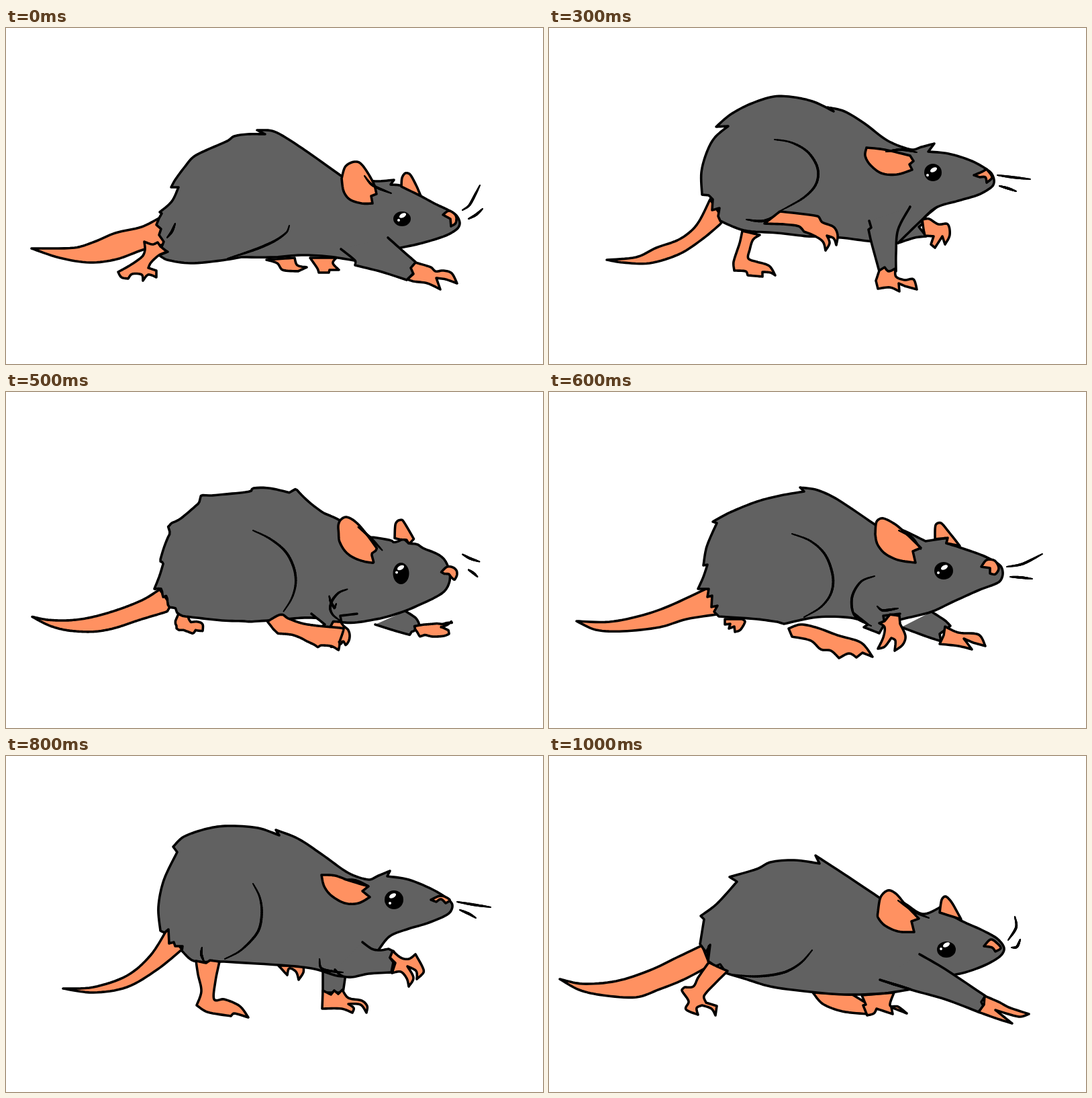
Animation of 800 by 500 pixels, one loop 1.1 s. Source, as an HTML page with a canvas:

```html
<!DOCTYPE html>
<html lang="en">
<head>
<meta charset="utf-8">
<title>Running rat</title>
<style>
html, body { margin: 0; width: 100%; height: 100%; overflow: hidden; background: #fff; }
canvas { display: block; width: 800px; height: 500px; }
</style>
</head>
<body>
<canvas id="stage" width="800" height="500"></canvas>
<script>
const ctx = document.getElementById('stage').getContext('2d');
const GREY = '#616161', SKIN = '#ff9161', INK = '#000';
const STEP = 100, STEPS = 11;

// Curves are "x,y" points; * marks a sharp corner.
// Eye: x y rx ry, then the centres of the large and the small glint.
const poses = {
  0: {
    tail: '38,328* 102,327 132,318 163,305 202,296 228,283* 240,300* 236,322* 204,330 165,344 125,349 80,342 38,328',
    farHind: '388,345* 404,350 412,360 435,362* 448,356* 434,353 430,342*',
    farHand: '453,342* 464,358 466,364* 481,364* 482,360* 496,360* 487,350 492,342*',
    body: '228,283* 232,276* 229,274* 247,258 257,237* 246,237* 252,226 266,207 279,192 298,182 330,168 340,161 360,158 386,158* 374,152* 396,153 415,162 450,185 502,222* 525,225 552,228 578,226* 573,233* 590,235 616,249 640,262 659,271 671,279 676,290 672,299 655,309 620,320 588,327* 519,346* 480,340 440,338 400,341 350,341* 320,346 275,350 240,345 228,338* 241,333* 231,328* 235,318* 228,308* 231,299* 224,293*',
    hind: '206,318* 218,322 226,319* 230,325* 240,333* 228,338 216,349 212,357* 224,361* 224,371* 212,367 204,376* 202,367 188,366 182,373* 172,371 167,363* 185,353 203,340 207,330',
    arm: '569,312 588,329 610,348* 607,356* 610,362* 597,375* 560,363 520,353* 520,346 499,329',
    hand: '610,349* 633,356 640,362 652,361 664,365 672,380* 655,374 641,372* 647,389* 628,380 607,377 598,374* 607,366* 603,357*',
    farEar: '589,236* 590,223 595,216 602,218 611,234 618,250*',
    ear: '500,224 505,207 515,200 526,200 536,211 548,232 552,247* 544,250* 546,261* 530,261 512,255 503,243 500,224',
    nose: '651,278* 660,272 670,279 670,290 663,295* 662,284*',
    thigh: '422,294 418,304 400,317 370,330 330,343',
    fold: '252,291 247,303 240,312',
    earLine: '534,220 546,234 574,246',
    whisker: '680,271 690,264 700,246 706,234',
    whisker2: '689,284 700,278 710,269',
    eye: [590, 284, 13, 11, 591, 279, 585, 286]
  },
  2: {
    tail: '68,344* 100,345 140,331 180,317 210,299 226,281 235,266* 241,281* 247,290* 247,299* 225,316 192,334 150,347 100,351 68,344',
    farHind: '313,318* 311,333 301,350 303,363* 317,366 335,371* 336,362* 345,362 361,369* 358,358 340,351 328,346* 337,330*',
    farHand: '540,306* 545,315* 552,314* 553,320* 563,315 567,300 556,294*',
    body: '228,272* 226,245 235,222 250,190 263,173 285,156 310,143 340,136 371,135* 370,129* 395,133 420,144 450,166 484,188* 520,198 552,204 597,207 630,211 650,215 661,223 663,234 655,247 630,260 590,278 560,298 526,321* 500,333 450,330 380,324 300,312 248,298* 247,290* 241,287* 240,268* 235,268*',
    hind: '292,292* 310,289 330,291 352,303 368,320 385,329 395,340 394,351 390,354* 386,343 374,340* 370,345 369,356* 362,350 357,338 340,324 318,313* 306,311* 310,303*',
    arm: '524,322* 543,349* 536,349* 530,362* 520,362* 500,350 486,334* 491,331* 478,323 470,309',
    hand: '534,348* 544,347* 548,358 556,366 575,366 584,382* 570,378* 566,386* 550,380 532,377* 530,364*',
    farEar: '556,202* 560,190 570,185 581,191 592,204* 598,205* 567,203* 571,195*',
    ear: '484,187* 510,195 543,215* 539,222* 544,233* 530,237 510,239 492,229 481,207 484,187',
    nose: '635,219* 648,217 658,223 653,235* 648,228 638,227*',
    thigh: '367,186 385,200 396,225 391,252 375,270 350,284 310,291',
    fold: '282,280 287,299* 306,291',
    earLine: '510,196 530,206 545,214',
    shoulder: '525,283 526,300 524,328',
    whisker: '669,222 690,225 709,237',
    whisker2: '673,239 680,243 689,252',
    eye: [573, 236, 11.5, 11.5, 575, 230, 569, 238]
  },
  3: {
    tail: '86,345* 130,341 160,327 195,314 220,293 240,255* 260,285* 255,292* 230,313 195,336 150,350 110,349 86,345',
    farHind: '288,302* 284,320 275,348 276,361* 293,362 296,368* 318,370* 318,363* 330,364 337,368* 328,354 310,348* 297,343 299,330 304,315 314,308*',
    farArm: '577,267 555,286 557,291* 551,296* 562,310* 545,312 520,320',
    farHand: '556,285* 566,284 580,292 594,292 597,308 590,322* 586,310* 575,327* 569,322* 573,310* 560,309* 558,300*',
    body: '228,248* 227,215 235,185 247,163 267,146* 249,147* 270,129 300,113 335,102 365,103 395,110 424,124* 415,118* 440,124 470,142 505,168 540,181 555,177 574,172* 565,184* 595,187 630,198 657,214 663,226 660,236 640,248 610,257 577,267 555,286 520,320* 475,317 435,312 384,310* 340,305 290,301 255,287* 252,280* 254,268* 243,271* 244,255* 238,249*',
    hind: '321,291* 344,273* 400,280 407,289 424,296 430,308 428,323* 424,313 414,309* 418,320 412,331* 408,318 395,309 380,303* 372,295 350,292*',
    arm: '538,266 520,300 517,335 517,362* 492,362* 480,318 476,300* 480,297* 477,287',
    hand: '492,361* 500,356* 506,362 516,358* 517,370 530,375 543,374 548,389* 530,384* 521,380* 522,392* 508,386 490,388* 487,376*',
    ear: '473,178* 500,181 538,190* 543,198* 537,203* 541,211* 518,218 495,216 478,203 471,190 473,178',
    nose: '633,219* 645,214 652,210* 660,222 652,230* 650,222 642,222*',
    thigh: '336,166 360,170 385,184 400,208 398,232 380,252 345,272',
    fold: '294,285 320,287 345,275',
    earLine: '502,184 525,181 548,185',
    whisker: '668,219 690,222 717,225',
    whisker2: '671,235 685,239 696,243',
    eye: [572, 215, 13, 13, 573, 211, 564, 219]
  },
  4: {
    tail: '37,328* 60,336 110,338 160,327 200,313 222,296* 242,316* 215,330 175,347 130,359 90,354 62,342 37,328',
    farHind: '252,322* 238,344 239,356* 256,358 262,363* 280,361 283,353* 298,361* 295,348 283,345 268,347* 267,336 272,328*',
    farArm: '620,325 632,333 634,340* 630,354* 600,348 575,342',
    farHand: '627,348* 640,335 658,330* 668,330 680,306* 682,318 676,332* 692,331* 686,345 670,351 658,347* 648,354 630,352*',
    body: '220,293* 228,270 234,248* 228,250* 244,212* 247,208* 235,200* 262,192 285,160* 273,143* 290,149 340,149 375,141 418,142* 420,119* 426,130 440,147 470,171 505,205* 530,212 558,226* 568,219 574,205* 578,216* 592,214* 600,223 625,232 645,252 672,270 679,285 675,297 655,310 610,328 580,338 535,341 470,337 425,342 380,339 335,342 268,332* 240,318* 236,303* 231,306* 225,291* 216,294*',
    hand: '467,352* 490,350* 498,366 490,372* 492,379* 463,374*',
    hind: '422,331* 440,317* 446,317 452,326 475,335 510,334 544,332* 520,345* 511,350* 527,360 534,374* 520,366 505,358* 504,371* 494,364 480,353 438,353* 434,341*',
    farEar: '583,216* 585,190 590,179 598,195 609,225* 590,221*',
    ear: '505,207 504,195 515,184 527,190 540,210 553,238* 547,245* 550,255* 535,252 515,240 505,220 505,207',
    nose: '653,276* 664,270 675,277 670,289* 668,280 656,280*',
    thigh: '374,201 400,217 425,235 440,262 447,295 447,318',
    fold: '474,288 468,320* 464,308',
    earLine: '528,196 548,220 567,237',
    shoulder: '532,313 514,321* 516,333',
    whisker: '678,223 679,245 676,264',
    whisker2: '691,254 690,265 685,272',
    eye: [589, 274, 10, 19, 587, 262, 584, 268]
  },
  6: {
    tail: '41,341* 90,342 140,332 180,318 236,292* 250,320* 250,331* 205,338 165,350 110,356 70,354 41,341',
    farHind: '262,338* 262,346* 270,345* 268,352* 276,349* 277,357* 285,354 292,342 288,338*',
    farArm: '570,327 590,340 598,348* 582,360* 584,371* 560,363 525,350',
    farHand: '590,349* 610,358 640,361 650,378* 632,373* 618,367* 630,383* 610,378 582,375* 588,362*',
    body: '222,293* 230,275 236,257* 230,258* 235,230 250,195* 244,193* 270,179 310,163 345,154 380,148* 374,142* 400,146 430,160 488,199* 520,203 561,222* 594,217* 592,225* 620,234 650,245 672,258 676,271 670,283 640,295 600,313 570,327 530,337 490,346 450,336 400,335 350,345* 340,342* 310,338 253,334* 246,327* 251,318* 242,320* 243,303* 236,305* 238,293*',
    hind: '357,352* 375,346 400,351 430,362 465,373 482,394* 467,388* 458,395* 447,389 432,396* 420,385 405,383 390,370 362,364*',
    arm: '523,330 498,333* 500,345* 492,359* 469,350* 475,346* 455,330',
    hand: '508,331* 522,333* 523,345* 531,363 527,376 515,385* 516,370 510,366* 500,379 490,382* 498,365 500,350 492,344* 500,341*',
    farEar: '575,219* 576,198 584,195 597,210 612,229* 592,225* 594,217*',
    ear: '486,212 488,193 498,188 520,200 554,232* 542,237* 546,254* 520,250 500,240 489,226 486,212',
    nose: '644,260* 652,250 664,251 670,262 665,271 657,270* 657,262*',
    thigh: '362,211 390,222 412,243 423,275 420,300 405,320 380,335',
    fold: '489,319 497,325 520,322',
    earLine: '521,206 540,216 554,234',
    shoulder: '485,274 465,282 452,303 452,325 460,338 480,348',
    whisker: '682,260 705,256 735,241',
    whisker2: '687,275 703,276 720,278',
    eye: [588, 266, 14, 13, 589, 261, 580, 269]
  },
  8: {
    tail: '85,346* 130,344 180,327 215,297 240,258* 262,288* 225,318 180,344 130,352 85,346',
    farHind: '406,312* 419,326* 422,316 432,321 436,333* 443,322 443,312*',
    farArm: '506,325 502,352* 472,352* 472,318',
    farHand: '472,349* 484,355* 489,349* 495,354* 501,348* 510,360 530,364 538,372 537,382* 528,370 510,369* 518,375 516,382* 500,376 471,376*',
    body: '230,260* 227,225 235,185 255,143* 249,135* 265,120 300,108 330,104 375,107 407,118* 402,110* 435,123 470,146 510,174 540,184 555,178 572,171* 568,179* 600,184 640,201 664,219 660,234 630,248 600,257 572,268 556,287* 530,320 500,328 460,317 420,312 325,306* 280,305 262,290* 263,283* 252,283* 250,277* 243,279* 242,258* 236,263*',
    hind: '283,305* 298,308* 304,304* 318,306* 312,335 310,362 325,362 348,372 361,389* 340,383 335,387* 300,381 284,371* 291,350 286,325',
    arm: '531,277 545,287 557,289 570,287* 578,291* 572,300* 577,307* 574,322* 540,324 515,329 500,327 490,318',
    hand: '576,290* 588,300 600,302 610,295* 620,313 622,322 612,332* 611,320 598,313* 607,330 600,343* 597,331 588,321 575,323* 580,308* 572,300*',
    ear: '470,177* 490,178 510,185 540,194* 531,201* 542,210* 525,219 505,219 485,208 474,194 470,177',
    nose: '633,214* 648,208 661,214 655,219* 648,213 641,217*',
    thigh: '368,190 378,210 381,235 375,262 350,289 326,302',
    fold: '292,285 291,295 295,306',
    earLine: '504,184 520,185 540,193',
    shoulder: '467,302 470,316 490,321 502,322',
    whisker: '672,217 695,221 722,225',
    whisker2: '676,229 690,235 700,241',
    eye: [578, 214, 14, 14, 576, 208, 572, 219]
  },
  10: {
    tail: '16,332* 50,339 100,335 150,319 190,300 228,282* 240,312* 200,333 165,347 130,359 80,356 45,348 16,332',
    farHind: '393,352* 408,369 437,380 475,384* 485,375* 470,366 452,355*',
    farHand: '466,356* 514,352* 508,371 520,373 533,383* 510,374* 512,384* 488,376* 484,383 474,386* 468,371* 472,370*',
    body: '225,280* 231,243* 226,238* 250,220 280,187* 269,180* 310,168 330,158 365,155 403,160* 397,148* 440,176 494,212* 525,217 556,235 583,225* 610,243 645,259 668,272 678,286 672,298 650,311 620,322 590,328* 540,347* 500,353 440,355 380,350 330,343 290,331 260,322* 262,320* 255,310* 248,313* 237,305* 240,281* 234,292*',
    hind: '238,307* 250,313 266,320* 246,340 231,357 234,367* 250,372* 248,386* 242,376 228,371* 220,375 222,385* 204,377 208,365 198,349 202,344* 215,343 222,330',
    arm: '552,295 590,317 650,357* 644,366* 647,372* 640,381* 590,362 540,348 493,333',
    hand: '649,357* 670,366 685,374 715,384* 700,388 665,378* 690,398* 665,390 640,381* 648,370*',
    farEar: '582,233* 585,214 591,209 600,218 614,243*',
    ear: '490,232 494,210 505,200 517,205 530,220 551,242* 540,246* 544,262* 520,261 500,252 490,240 490,232',
    nose: '648,283* 658,273 668,279 673,286 665,291* 660,285',
    thigh: '392,289 375,308 350,322 310,328 270,325',
    fold: '238,282 236,300',
    earLine: '520,215 545,232 566,241',
    shoulder: '493,333 515,340 540,347',
    whisker: '694,239 696,255 684,274',
    whisker2: '702,273 697,284 689,285',
    eye: [592, 288, 14, 12, 592, 281, 584, 287]
  }
};

// Painting order: part, fill, closed
const layers = [
  ['tail', SKIN, 1], ['farHind', SKIN, 1], ['farArm', GREY], ['farHand', SKIN, 1],
  ['body', GREY, 1], ['farEar', SKIN, 1], ['arm', GREY], ['hand', SKIN, 1],
  ['thigh'], ['fold'], ['shoulder'], ['hind', SKIN, 1],
  ['ear', SKIN, 1], ['earLine'], ['nose', SKIN, 1], ['whisker'], ['whisker2']
];

const mix = (a, b, k) => a + (b - a) * k;
const dist = (a, b) => Math.hypot(a[0] - b[0], a[1] - b[1]);

function tangent(a, p, b, len) {
  const dx = (b[0] - a[0]) / 2, dy = (b[1] - a[1]) / 2;
  const k = Math.min(1, len / (Math.hypot(dx, dy) || 1));
  return [dx * k, dy * k];
}

// Spline through the points, broken at corners
function trace(text, closed) {
  const pts = text.split(' ').map(s => [...s.replace('*', '').split(',').map(Number), s.endsWith('*')]);
  if (closed) pts.push([pts[0][0], pts[0][1], true]);
  const out = [pts[0].slice(0, 2)];
  for (let i = 1; i < pts.length; i++) {
    const p = pts[i - 1], q = pts[i], len = dist(p, q);
    const before = p[2] ? p : pts[i - 2] || p;
    const after = q[2] ? q : pts[i + 1] || q;
    const m = tangent(before, p, q, len), n = tangent(p, q, after, len);
    for (let j = 1; j <= 8; j++) {
      const t = j / 8, u = t * t, v = u * t;
      out.push([0, 1].map(c => (2 * v - 3 * u + 1) * p[c] + (v - 2 * u + t) * m[c] +
        (3 * u - 2 * v) * q[c] + (v - u) * n[c]));
    }
  }
  return out;
}

// Evenly spaced points along a line
function resample(line, count) {
  const at = [0];
  for (let i = 1; i < line.length; i++) at.push(at[i - 1] + dist(line[i], line[i - 1]));
  const total = at[at.length - 1];
  let s = 1;
  return Array.from({ length: count + 1 }, (_, i) => {
    const d = total * i / count;
    while (s < line.length - 1 && at[s] < d) s++;
    const k = (d - at[s - 1]) / (at[s] - at[s - 1] || 1);
    return [0, 1].map(c => mix(line[s - 1][c], line[s][c], k));
  });
}

function blend(a, b) {
  const p = resample(a, 240), q = resample(b, 240);
  return p.map((v, i) => [0, 1].map(c => mix(v[c], q[i][c], 0.5)));
}

function build(pose) {
  const shape = { eye: pose.eye };
  for (const [name, , closed] of layers) {
    if (pose[name]) shape[name] = trace(pose[name], closed);
  }
  return shape;
}

function between(a, b) {
  const shape = { eye: a.eye.map((v, i) => mix(v, b.eye[i], 0.5)) };
  for (const [name] of layers) {
    shape[name] = a[name] && b[name] ? blend(a[name], b[name]) : a[name] || b[name];
  }
  return shape;
}

const shapes = [];
for (const key in poses) shapes[key] = build(poses[key]);
for (let i = 0; i < STEPS; i++) {
  shapes[i] = shapes[i] || between(shapes[i - 1], shapes[i + 1]);
}

function paint(line, fill, closed) {
  ctx.beginPath();
  line.forEach(p => ctx.lineTo(p[0], p[1]));
  if (closed) ctx.closePath();
  ctx.fillStyle = fill;
  ctx.fill();
  ctx.lineWidth = 3.6;
  ctx.stroke();
}

// Brush stroke that thins out at both ends
function brush(line) {
  const pts = resample(line, 40);
  for (let i = 1; i < pts.length; i++) {
    ctx.lineWidth = 2 + 1.8 * Math.sin(Math.PI * i / 40);
    ctx.beginPath();
    ctx.moveTo(...pts[i - 1]);
    ctx.lineTo(...pts[i]);
    ctx.stroke();
  }
}

function oval(x, y, rx, ry, turn, fill) {
  ctx.beginPath();
  ctx.ellipse(x, y, rx, ry, turn, 0, Math.PI * 2);
  ctx.fillStyle = fill;
  ctx.fill();
}

function draw(shape) {
  ctx.fillStyle = '#fff';
  ctx.fillRect(0, 0, 800, 500);
  ctx.strokeStyle = INK;
  ctx.lineCap = ctx.lineJoin = 'round';
  for (const [name, fill, closed] of layers) {
    if (!shape[name]) continue;
    if (fill) paint(shape[name], fill, closed);
    else brush(shape[name]);
  }
  const [x, y, rx, ry, gx, gy, sx, sy] = shape.eye;
  oval(x, y, rx, ry, 0, INK);
  oval(gx, gy, 5.5, 3, -0.5, '#fff');
  oval(sx, sy, 2, 2, 0, '#fff');
}

const start = performance.now();
let shown = -1;
function tick() {
  const step = Math.floor((performance.now() - start) / STEP) % STEPS;
  if (step !== shown) draw(shapes[shown = step]);
  requestAnimationFrame(tick);
}
tick();
</script>
</body>
</html>
```
